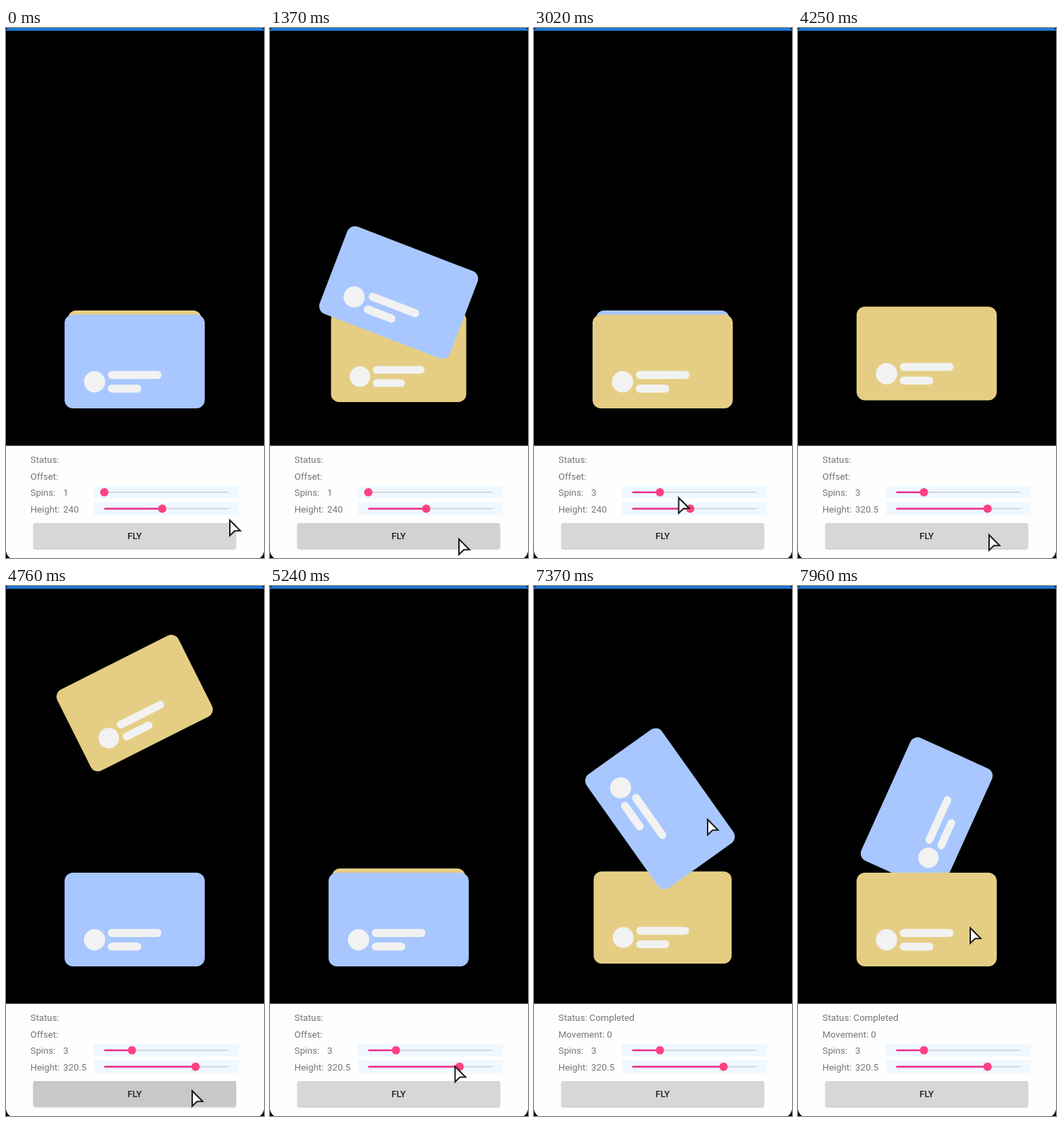
An HTML page that plays this animation: 370x758 px, repeating every 8000 ms.

```html
<!DOCTYPE html>
<html lang="en">
<head>
<meta charset="utf-8">
<title>Flying cards</title>
<style>
html, body { margin: 0; width: 100%; height: 100%; overflow: hidden; background: #000; }
svg { display: block; width: 370px; height: 758px; }
text { font-family: Roboto, sans-serif; font-size: 13.3px; fill: #757575; }
#fly { font-size: 13px; font-weight: 500; fill: #212121; text-anchor: middle; }
</style>
</head>
<body>
<svg viewBox="0 0 370 758">
  <defs>
    <g id="face">
      <rect x="-100.5" y="-67" width="201" height="134" rx="12"/>
      <g fill="#f2f2f2">
        <circle cx="-57.5" cy="29" r="15.2"/>
        <rect x="-38.5" y="13.5" width="77" height="11.5" rx="5.75"/>
        <rect x="-38.5" y="33" width="48" height="11.5" rx="5.75"/>
      </g>
    </g>
    <filter id="soft" x="-5%" y="-20%" width="110%" height="150%">
      <feGaussianBlur stdDeviation="1.3"/>
    </filter>
  </defs>
  <rect width="370" height="758"/>
  <rect width="370" height="4" fill="#1976d2"/>
  <path d="M0 0H4Q1 0 0 3ZM370 0H366Q369 0 370 3Z"/>
  <g id="deck">
    <use id="blue" href="#face" fill="#a8c7ff"/>
    <use id="gold" href="#face" fill="#e5ce84"/>
  </g>
  <rect y="597.5" width="370" height="160.5" fill="#fefefe"/>
  <path d="M0 748Q1 755 6 758H0ZM370 748Q369 755 364 758H370Z"/>
  <text id="status" x="35" y="622"></text>
  <text id="move" x="35" y="645.5"></text>
  <text x="35" y="669">Spins:</text>
  <text id="spins" x="82" y="669"></text>
  <text x="35" y="693">Height:</text>
  <text id="height" x="82" y="693"></text>
  <g id="sliders"></g>
  <rect x="39.5" y="710.5" width="290" height="35" rx="2" fill="#000" opacity=".25" filter="url(#soft)"/>
  <rect id="button" x="39" y="708" width="291" height="36" rx="2"/>
  <text id="fly" x="184.5" y="731">FLY</text>
  <path id="cursor" d="M1 3V25L8 18.3L16 18Z" fill="#fff" stroke="#1a1a1a" stroke-width="2"/>
</svg>
<script>
const LOOP = 8000, CX = 184.5, FRONT_Y = 477, BACK_Y = 467.6, BACK_SCALE = 0.95;
const GRAB = 5980, LIFT = 7040, RELEASE = 7243;
const $ = id => document.getElementById(id);
const clamp = v => Math.min(1, Math.max(0, v));
const mix = (a, b, k) => a + (b - a) * k;
const part = (t, from, to) => clamp((t - from) / (to - from));
const ease = k => k * k * (3 - 2 * k);
const glide = (t, from, to) => ease(part(t, from, to));
const bump = (t, from, to) => Math.sin(Math.PI * part(t, from, to)) ** 2;

const flights = [
  { at: 1321, span: 842, spins: 1, card: 'blue', next: 'gold', x: CX, y: FRONT_Y, top: 237 },
  { at: 4247.5, span: 842, spins: 3, card: 'gold', next: 'blue', x: CX, y: FRONT_Y, top: 156.5 },
  { at: RELEASE, span: 903, spins: 1, card: 'blue', next: 'gold', x: 170.5, y: 406.5, top: 285.6 }
];
// Pointer moves: from, to, x, y
const moves = [
  [300, 810, 270, 728], [1650, 2030, 212, 672], [2490, 2720, 181, 664], [2880, 3200, 243, 676],
  [3290, 3380, 262, 685], [3610, 3840, 273, 722], [4250, 4700, 266, 719], [5090, 5690, 256, 499],
  [GRAB, 6170, 246, 455], [LIFT, 7370, 248, 331], [7480, 7940, 246, 486]
];

function makeSlider(y) {
  const g = document.createElementNS('http://www.w3.org/2000/svg', 'g');
  g.innerHTML = `<rect x="126" y="${y - 9}" width="208" height="18" fill="#f0f8ff"/>
    <path d="M141 ${y}H319" stroke="#d3d6d9" stroke-width="2"/>
    <path stroke="#f0288f" stroke-width="2.4"/><circle cy="${y}" r="6" fill="#ff4081"/>`;
  $('sliders').append(g);
  const bar = g.querySelectorAll('path')[1], knob = g.querySelector('circle');
  return k => {
    const x = 141 + 178 * k;
    bar.setAttribute('d', `M141 ${y}H${x}`);
    knob.setAttribute('cx', x);
  };
}
const setSpins = makeSlider(664), setHeight = makeSlider(687.5);

function place(id, x, y, angle, scale) {
  $(id).setAttribute('transform', `translate(${x} ${y}) rotate(${angle}) scale(${scale})`);
}
function raise(id) {
  if ($('deck').lastElementChild !== $(id)) $('deck').append($(id));
}

function drawFlight(f, t) {
  const q = part(t, f.at, f.at + f.span);
  const p = q + 0.15 * q * (1 - q);
  const down = p > 0.5;
  const u = Math.abs(2 * p - 1);
  const fall = 0.4 * u * u + 0.6 * u ** 5;
  const x = down ? CX : mix(CX, f.x, fall);
  const y = mix(f.top, down ? BACK_Y : f.y, fall);
  const angle = 360 * f.spins * Math.max(0, (p - 0.01) / 0.99);
  place(f.card, x, y, angle, mix(1, BACK_SCALE, p));
  const k = clamp(p / 0.23);
  place(f.next, CX, mix(BACK_Y, FRONT_Y, k), 0, mix(BACK_SCALE, 1, k));
  raise(down ? f.next : f.card);
}

// The held card jerks left, settles under the pointer, then is lifted.
function dragPose(t) {
  const pull = glide(t, GRAB, 6165), lift = glide(t, LIFT, RELEASE);
  const dx = -13.5 * pull - 26 * bump(t, GRAB, 6165) - 3 * bump(t, 6630, 6890);
  return { dx, dy: -44 * pull - 26.5 * lift, angle: 0.74 * dx * (1 - lift) };
}

function draw(t) {
  const flight = flights.filter(f => t >= f.at).pop();
  const dragging = t >= GRAB && t < RELEASE;
  const { dx, dy, angle } = dragPose(t);
  if (flight && !dragging) {
    drawFlight(flight, t);
  } else {
    place('blue', CX + dx, FRONT_Y + dy, angle, 1);
    place('gold', CX, BACK_Y, 0, BACK_SCALE);
    raise('blue');
  }

  const touched = t >= GRAB;
  $('status').textContent = 'Status:' + (touched ? dragging ? ' Running' : ' Completed' : '');
  $('move').textContent = touched
    ? 'Movement: ' + (dragging ? Math.round(dx - 0.2) / 10 : 0) : 'Offset:';

  const spins = 1 + Math.round(2 * part(t, 2720, 2820));
  const height = t < 3610 ? 240 : mix(304, 320.5, glide(t, 3610, 3700));
  $('spins').textContent = spins;
  $('height').textContent = Math.round(height * 10) / 10;
  setSpins((spins - 1) / 9);
  setHeight((height - 100) / 300);

  const press = at => glide(t, at, at + 130) - glide(t, at + 530, at + 780);
  const shade = Math.round(214 - 15 * (press(1320) + press(4265)));
  $('button').setAttribute('fill', `rgb(${shade},${shade + 1},${shade})`);

  let x = 320, y = 701;
  for (const [from, to, toX, toY] of moves) {
    const k = glide(t, from, to);
    x = mix(x, toX, k);
    y = mix(y, toY, k);
  }
  $('cursor').setAttribute('transform', `translate(${x} ${y})`);
}

const begin = performance.now();
function tick() {
  draw((performance.now() - begin) % LOOP);
  requestAnimationFrame(tick);
}
tick();
</script>
</body>
</html>
```
